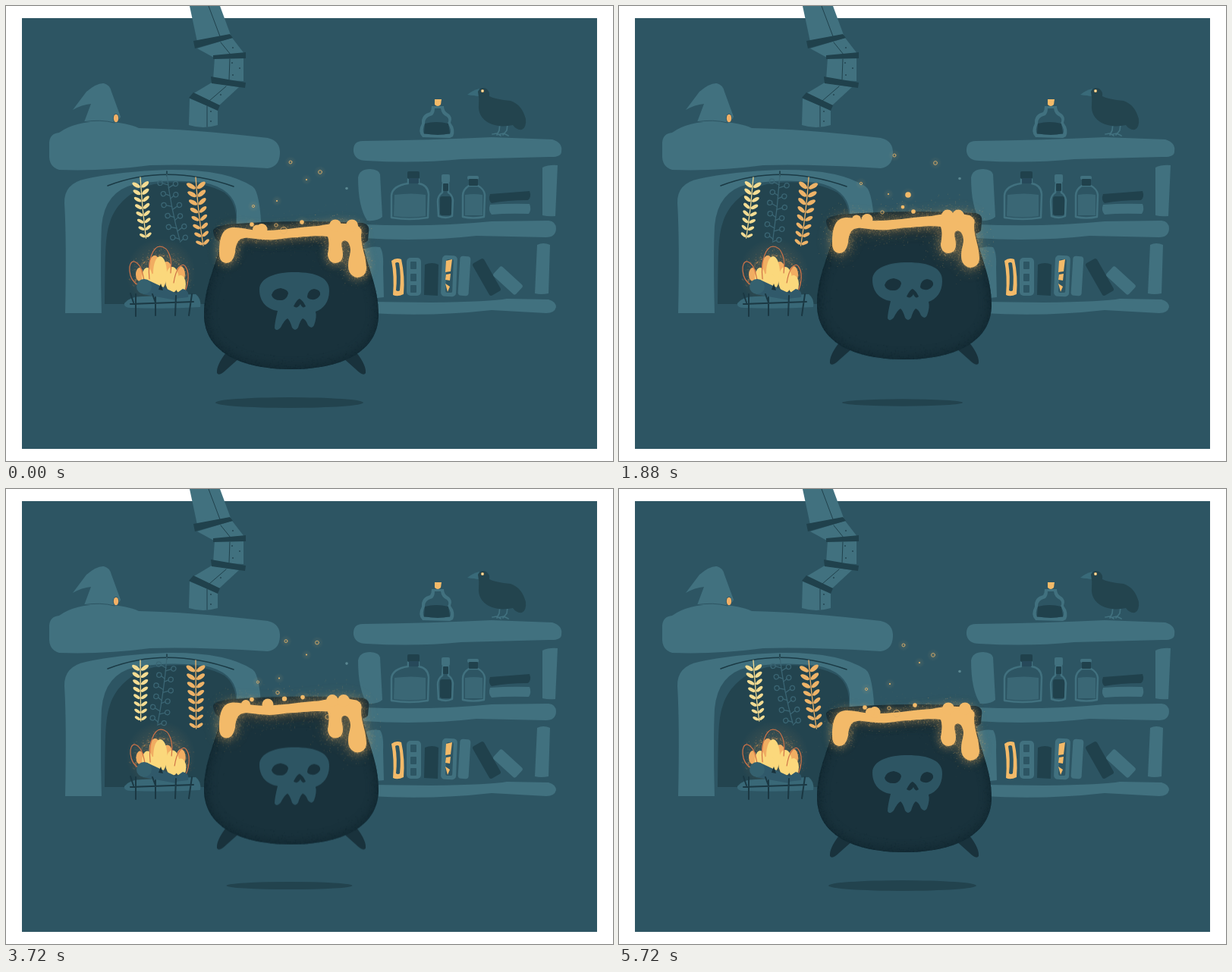
An HTML page with a canvas that plays this animation: 800x600 px, repeating every 5.76 s.

```html
<!DOCTYPE html>
<html lang="en">
<head>
<meta charset="utf-8">
<title>Bubbling cauldron</title>
<style>
html, body { margin: 0; width: 100%; height: 100%; overflow: hidden; background: #fff; }
canvas { display: block; width: 800px; height: 600px; }
</style>
</head>
<body>
<canvas id="stage" width="800" height="600"></canvas>
<script>
const LOOP = 5760, TAU = Math.PI * 2;
const BG = '#2d5563', MID = '#41717f', LOG = '#30596a', DARK = '#20414c', POT = '#19323c',
      HOLE = '#23444f', GOLD = '#f3ba69', PALE = '#f4dc93', FLAME = '#fbd87c';

const stage = document.getElementById('stage');
let g = stage.getContext('2d');

let seed = 7;
const rnd = () => (seed = (seed * 16807) % 2147483647) / 2147483647;
const clamp = v => Math.max(0, Math.min(1, v));
const ease = v => { v = clamp(v); return v * v * (3 - 2 * v); };
const wave = (t, peak, period = LOOP) => Math.cos(TAU * (t - peak) / period);

function fill(d, color) {
  g.fillStyle = color;
  g.fill(new Path2D(d));
}
function line(d, color, width = 1.5) {
  g.strokeStyle = color;
  g.lineWidth = width;
  g.stroke(new Path2D(d));
}
function oval(x, y, rx, ry, color, turn = 0) {
  g.fillStyle = color;
  g.beginPath();
  g.ellipse(x, y, Math.max(0, rx), Math.max(0, ry), turn, 0, TAU);
  g.fill();
}
function ring(x, y, r, color, width = 1.3) {
  g.strokeStyle = color;
  g.lineWidth = width;
  g.beginPath();
  g.arc(x, y, r, 0, TAU);
  g.stroke();
}
function slab(x, y, w, h, r, color, turn = 0) {
  g.save();
  g.translate(x + w / 2, y + h / 2);
  g.rotate(turn);
  g.fillStyle = color;
  g.beginPath();
  g.roundRect(-w / 2, -h / 2, w, h, r);
  g.fill();
  g.restore();
}
function halo(x, y, r, color, alpha) {
  const grad = g.createRadialGradient(x, y, 0, x, y, r);
  grad.addColorStop(0, color);
  grad.addColorStop(1, color + '00');
  g.globalAlpha = alpha;
  oval(x, y, r, r, grad);
  g.globalAlpha = 1;
}

// Draws once into its own canvas.
function layer(draw) {
  const c = document.createElement('canvas');
  c.width = 800;
  c.height = 600;
  const keep = g;
  g = c.getContext('2d');
  g.lineCap = g.lineJoin = 'round';
  draw();
  g = keep;
  return c;
}
// Airbrush grain scattered around an outline.
function spray(d, count, spread, color) {
  const p = document.createElementNS('http://www.w3.org/2000/svg', 'path');
  p.setAttribute('d', d);
  const len = p.getTotalLength();
  g.fillStyle = color;
  for (let i = 0; i < count; i++) {
    const q = p.getPointAtLength(rnd() * len), a = rnd() * TAU, r = spread * rnd() * rnd();
    g.globalAlpha = 0.1 + 0.25 * rnd();
    g.fillRect(q.x + r * Math.cos(a), q.y + r * Math.sin(a), 1, 1);
  }
  g.globalAlpha = 1;
}

const LIQUID = 'M281,326 C281,307 284,292 300,292 C314,292 322,297 345,296 C372,295 390,291 412,290 ' +
  'Q440,284 462,289 Q471,293 468,303 C468,318 475,330 475,346 C475,354 469,358 463,358 ' +
  'C455,357 451,351 451,342 C451,331 456,325 453,316 C451,309 446,308 443,311 C441,316 444,320 444,328 ' +
  'C444,335 440,339 434,339 C428,339 424,334 424,327 Q427,311 424,304 C410,302 390,305 370,306 ' +
  'C350,310 335,308 320,306 C306,304 303,313 302,325 C300,335 296,339 290,339 C284,338 281,334 281,326 Z';
const BODY = 'M285,308 C276,345 261,370 261,407 C261,456 310,479 376,479 C442,479 491,456 491,407 ' +
  'C491,370 476,345 469,308 Z';
const RIM = 'M273,296 Q274,291 292,288 Q375,281 470,286 Q480,288 478,298 L477,309 Q472,315 460,313 ' +
  'Q375,318 285,312 Q274,310 273,296 Z';
const LEG = 'M290,457 Q277,474 278,484 Q281,489 291,479 L309,463 Z';
const SKULL = 'M334,374 C334,358 356,351 380,351 C410,351 427,359 426,376 C426,390 418,400 408,403 ' +
  'Q410,410 406,421 Q403,427 398,421 Q395,413 391,412 Q388,414 385,424 Q381,430 377,424 ' +
  'Q374,414 371,412 Q367,414 362,424 Q357,430 354,425 Q354,418 358,402 C344,400 334,390 334,374 Z';
const FACE = 'M350,381 Q352,373 362,372 Q372,374 372,379 Q370,387 364,388 Q352,389 350,381 Z ' +
  'M397,383 Q398,374 406,373 Q415,374 414,381 Q410,388 403,387 Q397,386 397,383 Z ' +
  'M379,396 Q384,386 387,386 Q391,388 395,396 Q391,400 388,393 Q384,400 379,396 Z';

function pipe() {
  fill('M242,0 L282,0 L296,38 L252,47 Z M252,56 L298,42 L315,64 L274,68 Z M275,68 L313,67 L313,99 L273,97 Z ' +
    'M271,101 L307,107 L281,131 L246,116 Z M242,122 L279,137 L279,157 Q260,163 241,157 Z', MID);
  line('M267,0 L282,40 M283,48 L296,64 M295,70 L294,97 M290,106 L268,125 M265,132 L265,159', DARK, 1);
  fill('M247,46 L295,37 L299,42 L249,56 Z M273,65 L316,61 L316,69 L273,70 Z ' +
    'M270,93 L316,101 L315,108 L271,102 Z M247,114 L282,131 L279,138 L241,121 Z', DARK);
  for (const [x, y] of [[298, 75], [308, 82], [299, 91], [283, 117], [270, 139], [270, 152], [299, 55]])
    oval(x, y, 0.9, 0.9, DARK);
}

function hearth() {
  fill('M78,405 Q80,310 77,260 Q76,234 105,228 Q150,218 213,216 Q290,215 325,238 Q335,245 337,300 L337,404 ' +
    'L270,404 L126,405 Z', MID);
  fill('M126,405 Q124,330 126,290 Q130,244 170,235 Q215,227 262,233 Q300,241 304,270 L304,405 Z', BG);
  fill('M130,393 C131,330 130,305 137,285 C144,262 165,242 195,235 Q250,226 288,246 Q301,256 303,275 L303,393 Z', HOLE);
  fill('M57,180 Q58,168 70,167 Q90,152 130,152 Q160,154 175,161 Q240,162 345,174 Q362,178 361,195 ' +
    'Q360,212 345,214 Q250,208 190,210 Q130,218 70,216 Q56,212 57,195 Z', MID);
  fill('M88,137 L106,113 Q120,101 129,102 Q137,104 139,113 L151,146 Q149,153 140,153 L103,153 ' +
    'L112,129 Q100,130 88,137 Z', MID);
  line('M100,153 Q125,149 143,154', BG, 1);
  oval(145, 148, 4, 6, BG);
  oval(145, 148, 3.2, 5.2, '#f2b066');
  line('M134,237 Q212,207 300,238', '#1b3a45', 1.6);
  line('M212,218 L212,224', '#1b3a45', 1.5);
}

function shelf() {
  const boards = [
    'M458,192 Q457,178 470,178 Q560,177 640,173 L720,176 Q734,180 732,192 Q732,200 715,199 L600,202 Q540,208 475,204 Q460,204 458,192 Z',
    'M470,288 Q560,292 640,284 L715,283 Q725,284 725,294 Q724,305 712,305 L620,303 Q550,311 470,306 Z',
    'M480,390 L560,391 Q640,390 660,386 L715,387 Q725,390 725,397 Q723,405 712,405 L640,401 Q560,410 480,405 Z',
    'M464,226 Q466,215 480,215 Q492,216 493,222 L496,278 Q490,284 476,283 Q464,265 464,226 Z',
    'M707,213 Q715,209 727,210 L724,277 Q715,278 707,276 Z',
    'M470,322 Q480,316 493,318 Q498,325 497,345 L498,384 L480,386 Z',
    'M700,315 Q708,311 717,315 L715,379 Q705,381 697,379 Z'];
  boards.forEach(d => fill(d, MID));

  // bottles
  fill('M561,132 L577,132 Q577,139 583,142 Q589,146 586,154 Q593,163 589,172 L585,174 L549,173 ' +
    'Q542,166 548,155 Q547,143 559,140 Q561,137 561,132 Z', MID);
  fill('M565,135 L573,135 Q574,143 581,146 Q585,149 582,155 Q588,163 585,169 L551,169 ' +
    'Q548,164 552,155 Q551,147 562,144 Q565,141 565,135 Z', BG);
  fill('M552,155 Q567,151 583,155 L585,168 Q570,172 551,168 Z', DARK);
  fill('M565,123 L574,123 L573,130 Q569,134 565,130 Z', GOLD);
  line('M530,228 L530,234 Q509,237 508,250 L508,279 Q532,283 556,279 L557,248 Q556,236 544,234 L544,228 Z', MID, 2.5);
  fill('M512,249 Q535,246 553,249 L553,277 Q532,280 511,277 Z', '#3a6775');
  slab(529, 218, 16, 10, 2, DARK);
  slab(531, 227, 13, 7, 1, '#27495a');
  line('M576,233 L575,246 Q569,250 569,258 L570,277 Q580,281 588,277 L589,256 Q588,249 583,246 L583,233 Z', MID, 2.5);
  slab(572, 251, 15, 25, 3, DARK);
  slab(574, 222, 11, 11, 2, MID);
  slab(576, 234, 7, 10, 1, DARK);
  line('M610,237 Q602,242 602,250 L602,278 Q616,281 630,278 L631,249 Q630,241 622,237 Z', MID, 2.5);
  fill('M605,249 Q617,247 628,249 L628,276 L605,276 Z', '#3a6775');
  slab(608, 224, 15, 5, 2, MID);
  slab(610, 228, 12, 9, 1, DARK);

  // books
  fill('M638,248 Q665,246 690,244 Q693,252 688,256 Q660,256 640,260 Q635,256 638,248 Z', DARK);
  fill('M638,262 Q665,260 690,261 Q693,268 689,274 Q660,273 640,275 Q635,270 638,262 Z', MID);
  fill('M508,336 Q514,331 521,334 Q526,356 524,380 Q516,384 510,381 Q512,356 508,336 Z', GOLD);
  fill('M513,339 Q516,337 518,339 Q521,356 519,375 Q517,377 514,375 Q516,356 513,339 Z', BG);
  slab(528, 332, 19, 50, 5, MID);
  for (const y of [337, 353, 368]) slab(533, y, 8, 10, 1, BG);
  fill('M552,341 Q562,337 570,341 L569,382 L551,381 Z', DARK);
  slab(574, 329, 20, 54, 5, MID, 0.04);
  slab(580, 334, 9, 44, 2, BG, 0.04);
  fill('M580,336 L588,334 L586,350 L579,351 Z M580,354 L586,353 L585,362 L579,361 Z M579,366 L585,370 L582,377 Z', GOLD);
  slab(597, 330, 14, 52, 4, MID, 0.06);
  slab(625, 333, 17, 49, 3, DARK, -0.52);
  slab(653, 342, 17, 40, 3, MID, -0.83);
}

function logs() {
  fill('M156,392 Q163,383 180,383 L250,380 Q258,386 256,397 Q210,400 165,398 Q155,398 156,392 Z', '#396877');
  fill('M186,361 L229,381 L224,388 L180,380 Z', LOG);
  fill('M220,382 L233,373 Q242,375 240,384 L222,386 Z', LOG);
  oval(182, 370, 10, 10, '#35616f');
  fill('M201,374 L204,366 L207,375 Z', POT);
  line('M171,380 L171,409 M197,384 L197,408 M224,382 L223,408 M245,380 L241,408 M164,393 L247,390 ' +
    'M164,379 L168,391 M193,380 L197,391', '#1b3843', 2);
}

function potShape() {
  fill(LEG, POT);
  g.save();
  g.translate(752, 0);
  g.scale(-1, 1);
  fill(LEG, POT);
  g.restore();
  fill(BODY, POT);
  g.save();
  g.clip(new Path2D(BODY));
  g.filter = 'blur(6px)';
  line(BODY, '#10262f', 7);
  g.filter = 'none';
  spray(BODY, 2600, 26, '#11272f');
  g.restore();
  fill(RIM, '#162c35');
  fill(SKULL, BG);
  fill(FACE, POT);
}

// Soft light with grain around the brew.
function glow(width, blur, alpha, count, spread) {
  g.globalAlpha = alpha;
  g.filter = `blur(${blur}px)`;
  line(LIQUID, GOLD, width);
  g.filter = 'none';
  spray(LIQUID, count, spread, GOLD);
}

const room = layer(() => {
  g.fillStyle = '#fff';
  g.fillRect(0, 0, 800, 600);
  g.fillStyle = BG;
  g.fillRect(21, 16, 758, 568);
  pipe();
  hearth();
  shelf();
});
const grate = layer(logs);
const pot = layer(potShape);
const tightGlow = layer(() => glow(7, 5, 0.3, 2000, 18));
const wideGlow = layer(() => glow(12, 9, 0.17, 2400, 32));
const fireGlow = layer(() => spray('M170,366 Q174,332 202,328 Q234,332 238,366', 500, 16, '#f0a55c'));

// Stem hanging from (x, y); the sway grows towards the tip.
function hang(x, y, len, dx, steps, draw) {
  for (let i = 0; i < steps; i++) {
    const s = 0.16 + 0.82 * i / (steps - 1);
    g.save();
    g.translate(x + dx * s ** 1.3, y + len * s);
    g.rotate(-Math.atan(1.3 * dx * s ** 0.3 / len));
    draw(i, s);
    g.restore();
  }
}
function stem(x, y, len, dx, color) {
  line(`M${x},${y} Q${x + dx * 0.3},${y + len * 0.5} ${x + dx},${y + len}`, color, 1.3);
}
function sprig(x, y, len, dx, size, color) {
  stem(x, y, len, dx, color);
  hang(x, y, len, dx, 8, (i, s) => {
    const k = size * (1.05 - 0.35 * s);
    for (const side of [-1, 1])
      oval(side * k * 0.54, -k * 0.28, k * 0.54, k * 0.24, color, -side * 0.6);
  });
}
function berries(x, y, len, dx) {
  const color = '#3b6674';
  stem(x, y, len, dx, color);
  hang(x, y, len, dx, 6, i => {
    const w = i % 2 ? 8 : 10;
    line(`M0,0 L${-w + 3},-3 M0,4 L${w - 3},1`, color, 1.3);
    ring(-w, -4, 3.1, color);
    ring(w, 0, 3.1, color);
  });
}

function fire(k) {
  halo(204, 352, 46, '#f0a55c', 0.22);
  g.drawImage(fireGlow, 3 * k, 0);
  // x, y, rx, ry, hot
  const tongues = [
    [176, 354, 5, 9, 0], [196, 345, 8, 16, 0], [212, 350, 7, 13, 0], [230, 354, 6, 11, 0],
    [186, 359, 7, 14, 1], [203, 352, 9, 22, 1], [219, 361, 9, 17, 1], [197, 366, 10, 14, 1], [230, 367, 7, 12, 1]];
  tongues.forEach(([x, y, rx, ry, hot], i) => {
    const lift = k * (i % 2 ? 2 : -2);
    oval(x + 4 * k * (hot ? 0.6 : 1), y - lift, rx + k, ry - k * 2, hot ? FLAME : '#f1ad62');
  });
  g.save();
  g.translate(8 * k, 0);
  line('M174,368 C160,360 160,336 169,337 C178,340 180,352 182,362 ' +
    'M189,360 C186,335 194,317 203,317 C216,318 219,335 217,352 ' +
    'M221,365 C224,345 232,338 236,343 C242,350 241,364 236,376', '#cf7247', 1.2);
  g.restore();
  g.drawImage(grate, 0, 0);
}

function bird(t) {
  const lean = ease((t - 2100) / 360) - ease((t - 3060) / 340);
  const gape = ease((t - 2420) / 140) - ease((t - 3040) / 160);
  const dx = 5.5 * lean, dy = lean;
  line(`M${651 + dx},${155 + dy} L650,164 L647,170 M${661 + dx},${156 + dy} L660,164 L655,170 ` +
    'M641,169 L647,168 L652,171 M651,169 L656,168 L662,171', MID, 1.7);
  g.save();
  g.translate(dx, dy);
  fill(`M${608 + 2 * gape},${117 - 9 * gape} Q615,${111 - 3 * gape} 624,109 L625,${119 - 5 * gape} Z`, '#396a79');
  fill(`M${609 + 3 * gape},117 L625,${115 - 2 * gape} L624,119 Z`, '#396a79');
  fill('M622,113 Q625,106 633,109 Q638,113 637,119 Q645,123 665,125 Q680,130 685,149 Q686,160 680,163 ' +
    'Q673,164 668,157 Q650,161 636,154 Q622,146 623,131 Q624,122 622,113 Z', '#23444e');
  oval(628, 112, 2, 2, GOLD);
  oval(628, 112, 0.9, 0.9, '#fff3d0');
  g.restore();
}

const KEYS = [0, 800, 1880, 2960, 3720, 4360, LOOP];
function track(values, t) {
  let i = 0;
  while (t >= KEYS[i + 1]) i++;
  const a = values[i], b = values[(i + 1) % 6];
  return a + (b - a) * ease((t - KEYS[i]) / (KEYS[i + 1] - KEYS[i]));
}
// Bubbles in the pot's frame: radius, hollow, x track, y track.
const DRIFT = [
  [2, 1, [375, 374, 363, 363, 369, 368], [206, 208, 210, 213, 211, 212]],
  [2.4, 1, [414, 412, 417, 415, 410, 410], [219, 218, 220, 215, 213, 212]],
  [1, 0, [357, 358, 355, 357, 360, 361], [257, 259, 261, 262, 260, 260]],
  [1.6, 1, [326, 328, 319, 323, 332, 333], [264, 266, 247, 248, 265, 263]],
  [2.8, 0, [390, 390, 388, 390, 391, 392], [285, 287, 284, 283, 285, 285]],
  [2.2, 1, [356, 357, 347, 348, 358, 357], [289, 287, 285, 279, 279, 276]]];
// Short-lived ones: x, y, radius, hollow, start, end (may wrap round the loop).
const BRIEF = [
  [396, 229, 1, 0, 3400, 7300], [324, 288, 2.8, 0, 3400, 7250], [366, 296, 4.5, 1, 4800, 7200],
  [381, 262, 3.8, 0, 1400, 3350], [374, 278, 2.4, 0, 1400, 3350], [367, 287, 3.2, 0, 3350, 4850],
  [424, 311, 3, 1, 3350, 4900], [425, 285, 1.2, 0, 500, 1300]];
// Swellings on the surface: radius, x track.
const SWELL = [
  [7.5, [337, 345, 327, 349, 345, 338]], [6, [331, 330, 313, 326, 316, 310]],
  [8, [434, 438, 433, 440, 430, 433]], [8, [456, 448, 447, 452, 445, 446]]];

function bubble(x, y, r, hollow) {
  if (r < 0.2) return;
  halo(x, y, r + 6, GOLD, 0.12);
  if (hollow) ring(x, y, r, '#e8b56acc', 1);
  else oval(x, y, r, r, GOLD);
}

function cauldron(t, up) {
  oval(373.5, 523, 97.5 - 23 * up, 7 - 3 * up, '#22434e');
  g.save();
  g.translate(0, -16.5 * up);
  g.drawImage(pot, 0, 0);
  g.globalAlpha = 1 - 0.4 * up;
  g.drawImage(tightGlow, 0, 0);
  g.globalAlpha = 0.2 + 0.8 * up;
  g.drawImage(wideGlow, 0, 0);
  g.globalAlpha = 1;
  fill(LIQUID, GOLD);
  for (const [r, xs] of SWELL) {
    const x = track(xs, t);
    oval(x, x > 400 ? 289.5 : 294.5, r, r, GOLD);
  }
  oval(449, 240.5, 1.8, 1.8, '#5a8791');
  for (const [r, hollow, xs, ys] of DRIFT) bubble(track(xs, t), track(ys, t), r, hollow);
  for (const [x, y, r, hollow, from, to] of BRIEF) {
    const s = t + LOOP < to ? t + LOOP : t;
    bubble(x, y, r * ease((s - from) / 200) * ease((to - s) / 200), hollow);
  }
  g.restore();
}

function draw(t) {
  const up = (1 - wave(t, 0, 2880)) / 2;
  g.drawImage(room, 0, 0);
  sprig(177, 226, 80, 10 * wave(t, 5100), 11, PALE);
  berries(212, 222, 87, -1 + 18 * wave(t, 0));
  sprig(250, 226, 90, 0.5 + 12 * wave(t, 5150), 12.5, '#eeb368');
  fire((1 - wave(t, 0, 960)) / 2);
  bird(t);
  cauldron(t, up);
}

g.lineCap = g.lineJoin = 'round';
const start = performance.now();
function tick() {
  draw((performance.now() - start) % LOOP);
  requestAnimationFrame(tick);
}
tick();
</script>
</body>
</html>
```
